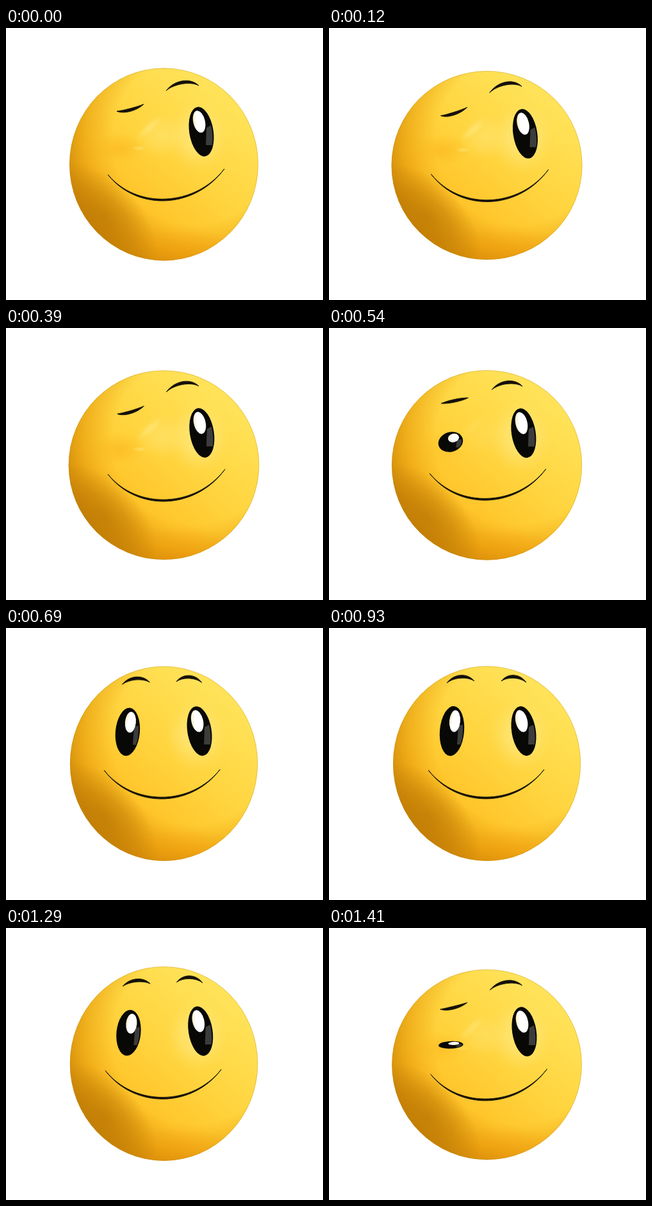
An HTML page that plays this animation: 495x425 px, repeating every 1440 ms.

```html
<!DOCTYPE html>
<html lang="en">
<head>
<meta charset="utf-8">
<title>Winking smiley</title>
<style>
  html, body { margin: 0; width: 100%; height: 100%; overflow: hidden; background: #fff; }
  svg { display: block; width: 100vw; height: 100vh; }
</style>
</head>
<body>
<svg viewBox="0 0 495 425" xmlns="http://www.w3.org/2000/svg">
  <defs>
    <linearGradient id="base" gradientUnits="userSpaceOnUse" x1="95" y1="-100" x2="-85" y2="125">
      <stop offset="0" stop-color="#ffe258"/>
      <stop offset=".42" stop-color="#ffd43e"/>
      <stop offset=".72" stop-color="#ffc52b"/>
      <stop offset="1" stop-color="#eeaa1a"/>
    </linearGradient>
    <radialGradient id="rim" gradientUnits="userSpaceOnUse" cx="50" cy="-38" r="212">
      <stop offset=".62" stop-color="#e69a08" stop-opacity="0"/>
      <stop offset=".82" stop-color="#e29808" stop-opacity=".5"/>
      <stop offset="1" stop-color="#c98206" stop-opacity=".85"/>
    </radialGradient>
    <radialGradient id="low">
      <stop offset="0" stop-color="#f99c10" stop-opacity=".75"/>
      <stop offset="1" stop-color="#f99c10" stop-opacity="0"/>
    </radialGradient>
    <radialGradient id="shade">
      <stop offset="0" stop-color="#b27000" stop-opacity=".6"/>
      <stop offset=".45" stop-color="#b27000" stop-opacity=".4"/>
      <stop offset="1" stop-color="#b27000" stop-opacity="0"/>
    </radialGradient>
    <radialGradient id="glow">
      <stop offset="0" stop-color="#ffea84" stop-opacity=".85"/>
      <stop offset=".5" stop-color="#ffe678" stop-opacity=".6"/>
      <stop offset="1" stop-color="#ffe060" stop-opacity="0"/>
    </radialGradient>
    <radialGradient id="warm">
      <stop offset="0" stop-color="#f9ae16" stop-opacity=".45"/>
      <stop offset="1" stop-color="#f9ae16" stop-opacity="0"/>
    </radialGradient>
    <linearGradient id="shine" x1="0" y1="0" x2="1" y2=".3">
      <stop offset="0" stop-color="#f3e2a4"/>
      <stop offset=".4" stop-color="#fff"/>
    </linearGradient>
    <clipPath id="disc"><circle r="150"/></clipPath>
    <filter id="soft" filterUnits="userSpaceOnUse" x="0" y="0" width="495" height="425">
      <feGaussianBlur stdDeviation=".65"/>
    </filter>
  </defs>
  <rect width="495" height="425" fill="#fff"/>
  <g id="ball">
    <circle r="150" fill="url(#base)"/>
    <g clip-path="url(#disc)">
      <ellipse cx="15" cy="150" rx="125" ry="52" fill="url(#low)"/>
      <circle r="150" fill="url(#rim)"/>
      <ellipse cx="-94" cy="82" rx="105" ry="55" fill="url(#shade)" transform="rotate(45 -94 82)"/>
    </g>
    <circle r="149.6" fill="none" stroke="#b08a28" stroke-opacity=".45" stroke-width=".8"/>
  </g>
  <g id="face" filter="url(#soft)">
    <g id="cheek">
      <ellipse cx="176" cy="188" rx="42" ry="24" fill="url(#warm)"/>
      <ellipse cx="243" cy="168" rx="42" ry="36" fill="url(#glow)" opacity=".55"/>
      <ellipse cx="224" cy="156" rx="28" ry="8" fill="url(#glow)" opacity=".7" transform="rotate(-42 224 156)"/>
      <ellipse cx="208" cy="188" rx="12" ry="4" fill="url(#glow)" opacity=".6"/>
    </g>
    <g id="eyeL">
      <ellipse rx="19" ry="39" fill="#080806" transform="rotate(5)"/>
      <path d="M10 -8 L17 -10 Q18 8 13 21 L8 21 Z" fill="#3c3c3c"/>
      <ellipse cx="4.5" cy="-15.5" rx="8.5" ry="17" fill="url(#shine)" transform="rotate(5 5 -16)"/>
    </g>
    <g id="eyeR">
      <ellipse cx="-4" cy="6" rx="50" ry="58" fill="url(#glow)"/>
      <ellipse rx="18.8" ry="39" fill="#080806" transform="rotate(-9)"/>
      <path d="M8 -6 L15 -10 Q19 6 17 21 L7 21 Z" fill="#3c3c3c"/>
      <ellipse cx="-3.5" cy="-15.5" rx="9.2" ry="17.5" fill="url(#shine)" transform="rotate(-13 -4 -16)"/>
    </g>
    <g fill="#15100a" stroke="#15100a" stroke-width=".9" stroke-linejoin="round">
      <path id="browL"/>
      <path id="browR"/>
      <path id="mouth"/>
    </g>
  </g>
</svg>
<script>
const LOOP = 1440, STEP = 30, CX = 246.5;
const $ = id => document.getElementById(id);
const move = (id, value) => $(id).setAttribute('transform', value);

// Each trait: value at rest, change by winking, change by pressing the face down
const curves = {
  browL: { x: [205.5, -11.5, 3], y: [84.5, 40, 17], span: [43, -1, -2], rise: [3, 8, 6], bow: [-8.5, 12, -.5], thick: 4.6 },
  browR: { x: [288.5, -13, 1], y: [84, 10, 6.5], span: [39, 12, -2], rise: [-2, 10, 5], bow: [-8, -1, -1.5], thick: 4.6 },
  mouth: { x: [245.5, 4.5, 3], y: [221.5, 3, .5], span: [181, 1, 4], rise: [1, 8, -5], bow: [44, 0, 4], thick: 2.8 }
};

function ramp(t, from, to) {
  const u = Math.min(1, Math.max(0, (t - from) / (to - from)));
  return u * u * (3 - 2 * u);
}

// One soft hump that may run across the loop's end
function hump(t, from, length) {
  const u = (t - from + LOOP) % LOOP / length;
  return u < 1 ? Math.sin(Math.PI * u) : 0;
}

// A stroke that is thickest in the middle
function taper(c, wink, press, dy) {
  const at = ([rest, w, p]) => rest + w * wink + p * press;
  const x = at(c.x), y = at(c.y) + dy, half = at(c.span) / 2, rise = at(c.rise) / 2;
  const bow = at(c.bow);
  const point = (k, depth) => `${x + half * k} ${y - rise * k + depth}`;
  const upper = (bow - c.thick / 2) * 4 / 3, lower = (bow + c.thick / 2) * 4 / 3;
  return `M${point(-1, 0)}C${point(-.5, upper)} ${point(.5, upper)} ${point(1, 0)}` +
    `C${point(.5, lower)} ${point(-.5, lower)} ${point(-1, 0)}Z`;
}

function draw(t) {
  const wink = 1 - ramp(t, 440, 730) + ramp(t, 1250, 1440);
  const press = ramp(t, 60, 210) * (1 - ramp(t, 270, 440));
  const spring = hump(t, 1410, 120);
  const dip = 2.5 * hump(t, 450, 180);
  const sway = -2 * hump(t, 480, 420) - hump(t, 1080, 240);

  const top = 59.5 + 5.5 * wink + 6 * press - 3.5 * spring + dip;
  const bottom = 364 - 2 * wink + 2 * spring;
  const height = bottom - top;
  const half = 146.5 + (304.5 - height) * .26;
  move('ball', `translate(${CX} ${(top + bottom) / 2}) scale(${half / 150} ${height / 300})`);

  const lid = (1 - wink) ** .7;
  move('face', `translate(${sway} 0)`);
  move('eyeR', `translate(${304 + wink + 4 * press} ${161 + wink + 9 * press + dip})`);
  move('eyeL', `translate(${190 + 2 * lid} ${184 - 23 * lid ** 1.5}) scale(1 ${Math.max(lid, .01)})`);
  $('eyeL').setAttribute('visibility', lid < .03 ? 'hidden' : 'visible');
  move('cheek', `translate(${4 * press} ${7 * press})`);
  $('cheek').setAttribute('opacity', Math.max(0, 1 - lid * 1.6));

  for (const id in curves) {
    $(id).setAttribute('d', taper(curves[id], wink, press, id === 'browR' ? dip : 0));
  }
}

const start = performance.now();
function tick() {
  const t = (performance.now() - start) % LOOP;
  draw(Math.floor(t / STEP) * STEP);
  requestAnimationFrame(tick);
}
tick();
</script>
</body>
</html>
```
